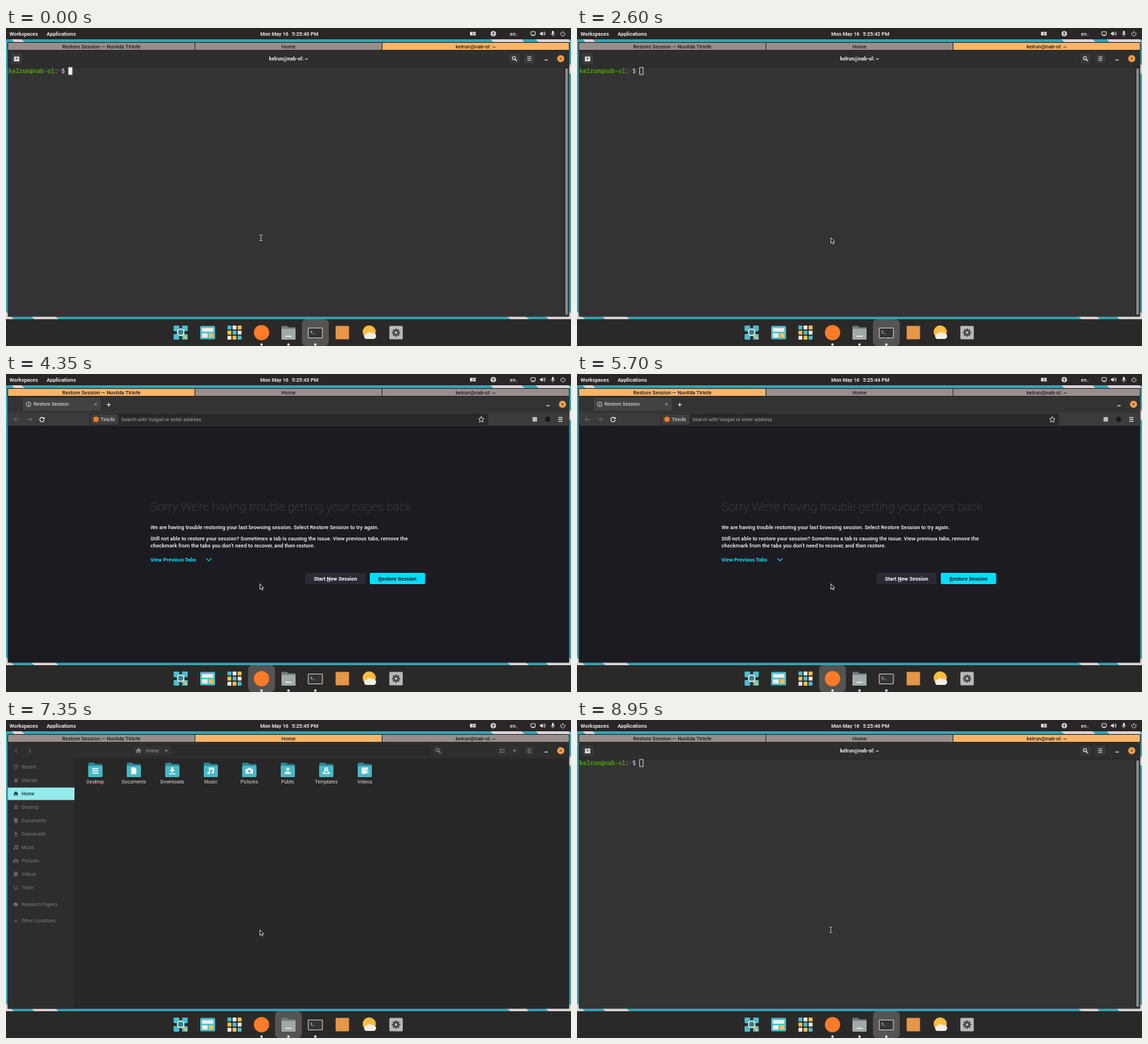
An HTML page for the animation above (9000 ms loop, 800 by 451 pixels).

```html
<!DOCTYPE html>
<html lang="en">
<head>
<meta charset="utf-8">
<title>Window stack</title>
<style>
html, body { margin: 0; width: 100%; height: 100%; overflow: hidden; background: #2b2928; }
svg { display: block; width: 800px; height: 451px; }
text { font-family: Roboto, "Noto Sans", sans-serif; white-space: pre; }
.mono { font-family: "Noto Sans Mono", "DejaVu Sans Mono", monospace; }
</style>
</head>
<body>
<svg id="stage" viewBox="0 0 800 451"></svg>
<script>
const rect = (x, y, w, h, fill, r = 0, more = '') =>
  `<rect x="${x}" y="${y}" width="${w}" height="${h}" fill="${fill}" rx="${r}" ${more}/>`;
const circle = (x, y, r, fill, more = '') => `<circle cx="${x}" cy="${y}" r="${r}" fill="${fill}" ${more}/>`;
const fillPath = (d, fill, more = '') => `<path d="${d}" fill="${fill}" ${more}/>`;
const line = (d, color = '#ddd', w = 1) => `<path d="${d}" fill="none" stroke="${color}" stroke-width="${w}"/>`;
const text = (s, x, y, size, fill = '#eee', more = '') =>
  `<text x="${x}" y="${y}" font-size="${size}" fill="${fill}" ${more}>${s}</text>`;
const group = (body, more = '') => `<g ${more}>${body}</g>`;
const at = (x, y, body, scale = 1) => group(body, `transform="translate(${x} ${y}) scale(${scale})"`);
const MID = 'text-anchor="middle" ', BOLD = 'font-weight="600"', MEDIUM = 'font-weight="500"';
const PROMPT = 'kelrun@nab-ol', BROWSER = 'Tirlofe';
const STAR = 'M0 -4L1.2 -1.3 4 -1 1.9 1 2.5 4 0 2.5 -2.5 4 -1.9 1 -4 -1 -1.2 -1.3Z';

// Small glyphs, each centred on 0,0 in a box of about 8
const glyph = {
  recent: c => rect(-3, -3, 6, 6, 'none', 1.5, `stroke="${c}"`) + line('M0 -2V.5H2', c, .8),
  star: c => fillPath(STAR, c),
  house: c => fillPath('M-4 0L0 -4 4 0H3V3.6H1V1H-1V3.6H-3V0Z', c),
  lines: c => line('M-3.5 -2.5H3.5M-3.5 0H3.5M-3.5 2.5H3.5', c, 1.2),
  page: c => fillPath('M-2.8 -3.8H1L2.8 -2V3.8H-2.8Z', c),
  down: c => fillPath('M-1 -4H1V-1H3L0 2 -3 -1H-1ZM-3.5 3H3.5V4H-3.5Z', c),
  note: c => line('M-1.5 2.5V-3H3V1.8M-1.5 -1.8H3', c, 1.2) + circle(-2.5, 2.6, 1.4, c) + circle(2, 2, 1.4, c),
  camera: c => fillPath('M-4 -2H-2L-1 -3.5H1L2 -2H4V3.2H-4ZM0 -1A1.6 1.6 0 1 0 .1 -1Z', c, 'fill-rule="evenodd"'),
  person: c => circle(0, -2, 1.7, c) + fillPath('M-3.5 3.5Q-3.5 .5 0 .5T3.5 3.5Z', c),
  shapes: c => line('M-4 3L0 -1 4 3M-3.5 3H3.5', c, 1.2) + circle(0, -2, 1.5, 'none', `stroke="${c}" stroke-width="1.1"`),
  film: c => circle(-1.8, -2.3, 1.7, c) + circle(1.8, -2.3, 1.7, c) + rect(-3.5, -.6, 5.5, 4, c) + fillPath('M2 1L4 -.5V3.2Z', c),
  trash: c => line('M-3.8 -3H-2.5V3H2.5V-3H3.8', c),
  folder: c => fillPath('M-3.6 -3H-.5L.5 -2H3.6V3H-3.6Z', c),
  plus: c => line('M-2.5 0H2.5M0 -2.5V2.5', c),
  search: c => circle(-.8, -.8, 2.2, 'none', `stroke="${c}" stroke-width="1.1"`) + line('M.9 .9L3.4 3.4', c, 1.4),
  menu: c => line('M-2.8 -2.5H2.8M-2.8 0H2.8M-2.8 2.5H2.8', c, 1.1),
  drop: c => fillPath('M-2.6 -1.2H2.6L0 1.6Z', c)
};
const icon = (name, x, y, color = '#ddd', scale = 1) => at(x, y, glyph[name](color), scale);

const closeButtons = (x, y = 43.5) =>
  rect(x - 23, y + 1.3, 4.6, 1.3, '#ddd') + circle(x, y, 5, '#f6a04a') +
  line(`M${x - 1.6} ${y - 1.6}l3.2 3.2m0 -3.2l-3.2 3.2`, '#4b3115', .9);
const button = (x, w = 16) => rect(x, 36, w, 15, '#383838', 2, 'stroke="#262626" stroke-width=".7"');
const frame = color => rect(2.5, 32, 795, 377.5, color, 1);

function wallpaper() {
  const pale = '#d9d4d8';
  return rect(0, 0, 800, 451, '#37a2b2') +
    fillPath('M8 16H22L26 20H12ZM686 16H730L734 20H690ZM750 16H796L800 20H754ZM797 50L800 53V66L797 63Z', pale) +
    fillPath('M0 402L11 413H0ZM36 409H70L74 413H40ZM710 409H736L740 413H714ZM764 409H797V402L800 405V413H768Z', pale);
}

function topBar() {
  const c = '#e8e6e4', y = 8;
  return rect(0, 0, 800, 16, '#292625') +
    text('Workspaces', 5, 10.5, 7.3, c, BOLD) + text('Applications', 57.5, 10.5, 7.4, c, BOLD) +
    text('Mon May 16', 360, 10.5, 7.2, c, BOLD) +
    `<text id="clock" x="404.8" y="10.5" font-size="7.2" fill="${c}" ${BOLD}></text>` +
    rect(657, 5.5, 3.6, 5, c) + rect(661.2, 5.5, 4, 2.2, c) + rect(661.2, 8.3, 4, 2.2, c) +
    circle(690, y, 3.8, c) + circle(690, 6, .8, '#292625') + line('M687.7 7.5H692.3M690 7.5V9L688.7 10.7M690 9L691.3 10.7', '#292625', .8) +
    text('en', 713.5, 10.5, 7.4, c, MEDIUM) + text('1', 722, 12, 4, c) +
    rect(743.2, 5.2, 6.2, 4.8, 'none', .6, `stroke="${c}"`) + rect(744.5, 10, 4, 1.2, c) +
    fillPath('M756 6.8H757.7L760 4.8V11.2L757.7 9.2H756Z', c) + line('M761.3 6Q762.6 8 761.3 10M762.6 5Q764.6 8 762.6 11', c, .8) +
    rect(773, 4, 2.6, 5, c, 1.3) + line('M771.7 7.5Q771.7 10 774.3 10T776.9 7.5M774.3 10V12', c, .7) +
    line('M786.8 5.8A3 3 0 1 0 790.2 5.8M788.5 4.5V8', c, .9);
}

function tab(i, label) {
  const x = 2.5 + i * 265;
  return rect(x, 20.5, 265, 11, '#988f8c', 0, `id="tab${i}" stroke="#2b2726"`) +
    text(label, x + 132.5, 28.6, 7.4, '#1f1c1b', MID + MEDIUM);
}

function dock() {
  const teal = '#49bfd0', cream = '#f2eee6', gold = '#ffc24d';
  const spots = [247.3, 285.5, 323.6, 361.8, 400, 438, 476.2, 514.3, 552.3];
  let dots = '', teeth = '';
  for (let i = 0; i < 9; i++) {
    const col = i % 3, row = Math.floor(i / 3);
    dots += rect(-10 + col * 7.2, -10 + row * 7.2, 5.5, 5.5, [teal, cream, gold][(col + row * 2) % 3], .6);
  }
  for (let a = 0; a < 360; a += 45) teeth += rect(-1.3, -5.8, 2.6, 3, '#4b4b4b', .5, `transform="rotate(${a})"`);
  const art = [
    rect(-10, -10, 8, 8, teal, 1) + rect(2, -10, 8, 8, teal, 1) + rect(-10, 2, 8, 8, teal, 1) + rect(2, 2, 8, 8, teal, 1) +
      line('M3 3L8.5 8.5', gold, 2.5) + circle(0, -.5, 4.6, '#2f8493', `stroke="${cream}" stroke-width="1.6"`),
    rect(-10.5, -9.5, 21, 19, teal, 1.5) + rect(-8, -6.5, 16, 5.2, cream, .5) + rect(-8, 1, 8, 6, cream, .5) + rect(2, 1, 6, 6, gold, .5),
    dots,
    circle(0, 0, 10.8, '#ff7b28'),
    fillPath('M-10 -9.5H-2L0 -7.5H10V9.5H-10Z', '#6f7a7c') + rect(-10, -5.5, 20, 15.5, '#a1aaab', 1) + rect(-4.5, 4.5, 9, 1.6, cream, .5),
    rect(-10, -6.5, 20, 14, '#343434', .8, 'stroke="#c9c9c9" stroke-width="1.1"') + text('$_', -7, .5, 5, '#eee', 'class="mono"'),
    rect(-9.5, -9.5, 19, 19, '#e59648', 1),
    circle(0, -1, 9.3, '#ffbc3e') + fillPath('M-5 9A4 4 0 0 1 -4 1.5A5 5 0 0 1 4 1A4 4 0 0 1 7 9Z', cream),
    rect(-9.5, -9.5, 19, 19, '#b9b9b9', 1.5) + teeth + circle(0, 0, 4.3, '#4b4b4b') + circle(0, 0, 1.8, '#c4c4c4')
  ];
  return rect(0, 413, 800, 38, '#2b2928') + rect(0, 413, 38, 38, '#565453', 6, 'id="focus"') +
    spots.map((x, i) => at(x, 432, art[i])).join('') +
    spots.slice(3, 6).map(x => circle(x, 449, 1.7, '#fff')).join('');
}

function terminal() {
  const head = rect(7, 36, 16, 15, '#3a3a3a', 2) + rect(11.3, 40.5, 7.4, 5.5, '#e6e6e6', .7) +
    line('M15 41.5V45M13.3 43.3H16.7', '#333', .8) + rect(11, 46, 8, 1.2, '#e6e6e6') +
    text(PROMPT + ': ~', 400, 45.8, 7.1, '#eee', MID + BOLD) +
    button(712) + icon('search', 720, 43.5) + button(733) + icon('menu', 741, 43.5);
  return frame('#333') + rect(2.5, 32, 795, 23, '#2e2e2e') + rect(2.5, 55, 795, .8, '#252525') +
    group(head, 'class="fade"') + closeButtons(785.5) +
    `<text class="mono" x="3.5" y="63.8" font-size="8.33" fill="#ddd"><tspan fill="#4e9a06" font-weight="700">${PROMPT}</tspan>:<tspan fill="#3f6594">~</tspan>$</text>` +
    rect(88.7, 56, 5, 10, '#eee', 0, 'id="caret" stroke="#ddd" stroke-width=".9"') +
    rect(790.5, 56, 6, 352, '#2a2a2a') + rect(792, 57, 3.6, 350, '#8c8c8c', 1.8);
}

function files() {
  const places = 'recent Recent,star Starred,house Home,lines Desktop,page Documents,down Downloads,note Music,camera Pictures,film Videos,trash Trash,folder Research Papers,plus Other Locations'.split(',');
  const folders = 'lines Desktop,page Documents,down Downloads,note Music,camera Pictures,person Public,shapes Templates,film Videos'.split(',');
  const split = s => [s.slice(0, s.indexOf(' ')), s.slice(s.indexOf(' ') + 1)];
  const rowY = i => i < 10 ? 66.3 + i * 19.05 : 261.5 + (i - 10) * 23.5;
  const row = (s, i) => {
    const [name, label] = split(s), chosen = i === 2;
    return icon(name, 14, rowY(i), chosen ? '#17383a' : '#a8a8a8', .85) +
      text(label, 22, rowY(i) + 2.3, 6.8, chosen ? '#17383a' : '#c8c8c8', chosen ? MEDIUM : '');
  };
  const folder = (s, i) => {
    const [name, label] = split(s), x = 126.5 + i * 54.5;
    return at(x, 71, fillPath('M-10 -9Q-10 -10.5 -8.5 -10.5H-2L0 -8.5H8.5Q10 -8.5 10 -7V8H-10Z', '#2c8796') +
      rect(-10, -6, 20, 16, '#48b9c7', 1) + at(0, 1, glyph[name]('#fff'), 1.25)) +
      text(label, x, 89.6, 6.8, '#ddd', MID);
  };
  const head = rect(180, 36, 420, 15, '#272727', 2, 'stroke="#202020" stroke-width=".7"') + button(180, 55) +
    icon('house', 187.7, 43.5) + text('Home', 198, 45.9, 6.9, '#ddd', MEDIUM) + icon('drop', 227, 43.7) +
    line('M16 40.5L13 43.5 16 46.5M32 40.5L35 43.5 32 46.5', '#888', 1.1) +
    button(604) + icon('search', 612, 43.5) + button(694, 34) + line('M711.5 36.5V51', '#242424', .7) +
    fillPath('M699 41H701V43H699ZM699 44.5H701V46.5H699ZM702 41.4H706V42.6H702ZM702 44.9H706V46.1H702Z', '#ddd') +
    icon('drop', 720, 43.7) + button(733) + icon('menu', 741, 43.5);
  const others = places.map(row);
  const home = others.splice(2, 1);
  return frame('#272727') + rect(2.5, 32, 795, 23, '#2e2e2e') + rect(2.5, 54.6, 795, .8, '#232323') +
    rect(2.5, 55.4, 94.5, 354, '#2d2d2d') + rect(97, 55.4, .7, 354, '#212121') +
    rect(2.5, 95.8, 94.5, 17.7, '#94ebeb') + home + group(head + others.join(''), 'class="fade"') +
    closeButtons(785.5) + folders.map(folder).join('');
}

function browser() {
  const cyan = '#00ddff', white = '#fbfbfe';
  const body = (s, y) => text(s, 204.5, y, 7.62, white, MEDIUM);
  return frame('#1c1b22') + rect(2.5, 32, 795, 23, '#333') + rect(2.5, 54.5, 795, 19.5, '#3b3b3b') +
    rect(24, 34, 110, 18, '#424242', 2) + rect(2.5, 73.6, 795, .8, '#161616') +
    circle(32, 43, 3.3, 'none', 'stroke="#ddd" stroke-width=".8"') + line('M32 42.5V45M32 41V41.8', '#ddd', .9) +
    text('Restore Session', 39, 45.4, 6.95) + line('M125 41.3l3.4 3.4m0 -3.4l-3.4 3.4', '#bbb', .8) + icon('plus', 145.5, 43.5, '#eee', 1.1) +
    closeButtons(788, 43) +
    line('M18.5 64.5H11.5M14.5 61.5L11.5 64.5 14.5 67.5M29.5 64.5H36.5M33.5 61.5L36.5 64.5 33.5 67.5', '#707070') +
    line('M53.6 62.6A3.2 3.2 0 1 0 54.2 65.2', '#eee', 1.1) + fillPath('M54.7 60.7V64H51.4Z', '#eee') +
    rect(119, 56.4, 563, 15.6, '#292929', 2, 'stroke="#222" stroke-width=".6"') + rect(120, 57, 39, 14.4, '#3f3f3f', 1.5) +
    circle(127.5, 64.2, 3.8, '#ff7b28') + text(BROWSER, 134, 66.6, 7.1) +
    text('Search with Vospel or enter address', 163, 66.6, 7.1, '#a6a6a6') +
    at(673, 64.3, fillPath(STAR, 'none', 'stroke="#ddd" stroke-width=".9"')) +
    rect(745.5, 61, 6.5, 6.5, '#bdbdbd', 1) + circle(767, 64.3, 3.6, '#171717') + icon('menu', 785, 64.3, '#ddd', 1.1) +
    text('Sorry We’re having trouble getting your pages back', 204.5, 194.3, 17, '#55545c', 'font-weight="100"') +
    body('We are having trouble restoring your last browsing session. Select Restore Session to try again.', 220) +
    body('Still not able to restore your session? Sometimes a tab is causing the issue. View previous tabs, remove the', 236.3) +
    body('checkmark from the tabs you don’t need to recover, and then restore.', 245.6) +
    text('View Previous Tabs', 204.5, 265.6, 7.4, cyan, BOLD) + line('M283.5 261.3L287.2 265 290.9 261.3', cyan, 1.1) +
    rect(424, 282, 85, 16, '#2b2a33', 2) + text('Start <tspan text-decoration="underline">N</tspan>ew Session', 466.5, 292.6, 7.4, white, MID + BOLD) +
    rect(515, 282, 78.5, 16, cyan, 2) + text('<tspan text-decoration="underline">R</tspan>estore Session', 554.2, 292.6, 7.4, '#1c1b22', MID + BOLD);
}

const BEAM = 'M-2 -4H-.6L0 -3.5 .6 -4H2M0 -3.5V3.5M-2 4H-.6L0 3.5 .6 4H2';
const pointer = group(line(BEAM, '#111', 2) + line(BEAM, '#eee', .9), 'id="beam"') +
  fillPath('M359.5 297.5V305.3L361.2 303.8 362.5 306.5 363.8 305.9 362.6 303.3H364.8Z', '#111', 'id="arrow" stroke="#eee" stroke-width=".8"');

const stage = document.getElementById('stage');
stage.innerHTML = wallpaper() + topBar() +
  [browser, files, terminal].map((draw, i) => group(draw(), `id="win${i}"`)).join('') +
  tab(0, `Restore Session — Nuvilda ${BROWSER}`) + tab(1, 'Home') + tab(2, PROMPT + ': ~') +
  dock() + pointer;

const $ = id => document.getElementById(id);
const LOOP = 9000;
const TICKS = [900, 2400, 3850, 5200, 6800, 8250];
// [start, window]; the list runs browser, files, terminal
const SWITCHES = [[-1000, 2], [2800, 1], [4350, 0], [7350, 1], [8750, 2]];

function show(t) {
  const [start, active] = SWITCHES.filter(s => s[0] <= t).pop();
  const focus = Math.min(1, (t - start) / 200);
  $('clock').textContent = `5:25:${40 + TICKS.filter(x => x <= t).length} PM`;
  for (let i = 0; i < 3; i++) {
    const on = i === active;
    $('win' + i).style.display = on ? '' : 'none';
    $('tab' + i).setAttribute('fill', on ? '#fbb568' : '#988f8c');
    if (on) $('win' + i).querySelectorAll('.fade').forEach(g => g.style.opacity = .5 + .5 * focus);
  }
  $('focus').setAttribute('x', 342.8 + 38.1 * active);
  $('caret').setAttribute('fill', t < 2100 ? '#eee' : 'none');
  const beam = active === 2 && (t < 2600 || t > 8000);
  $('beam').style.display = beam ? '' : 'none';
  $('arrow').style.display = beam ? 'none' : '';
  $('beam').setAttribute('transform', `translate(${t < 100 ? 361 : 359.3} 297.5)`);
}

const begin = performance.now();
function tick() {
  show((performance.now() - begin) % LOOP);
  requestAnimationFrame(tick);
}
tick();
</script>
</body>
</html>
```
